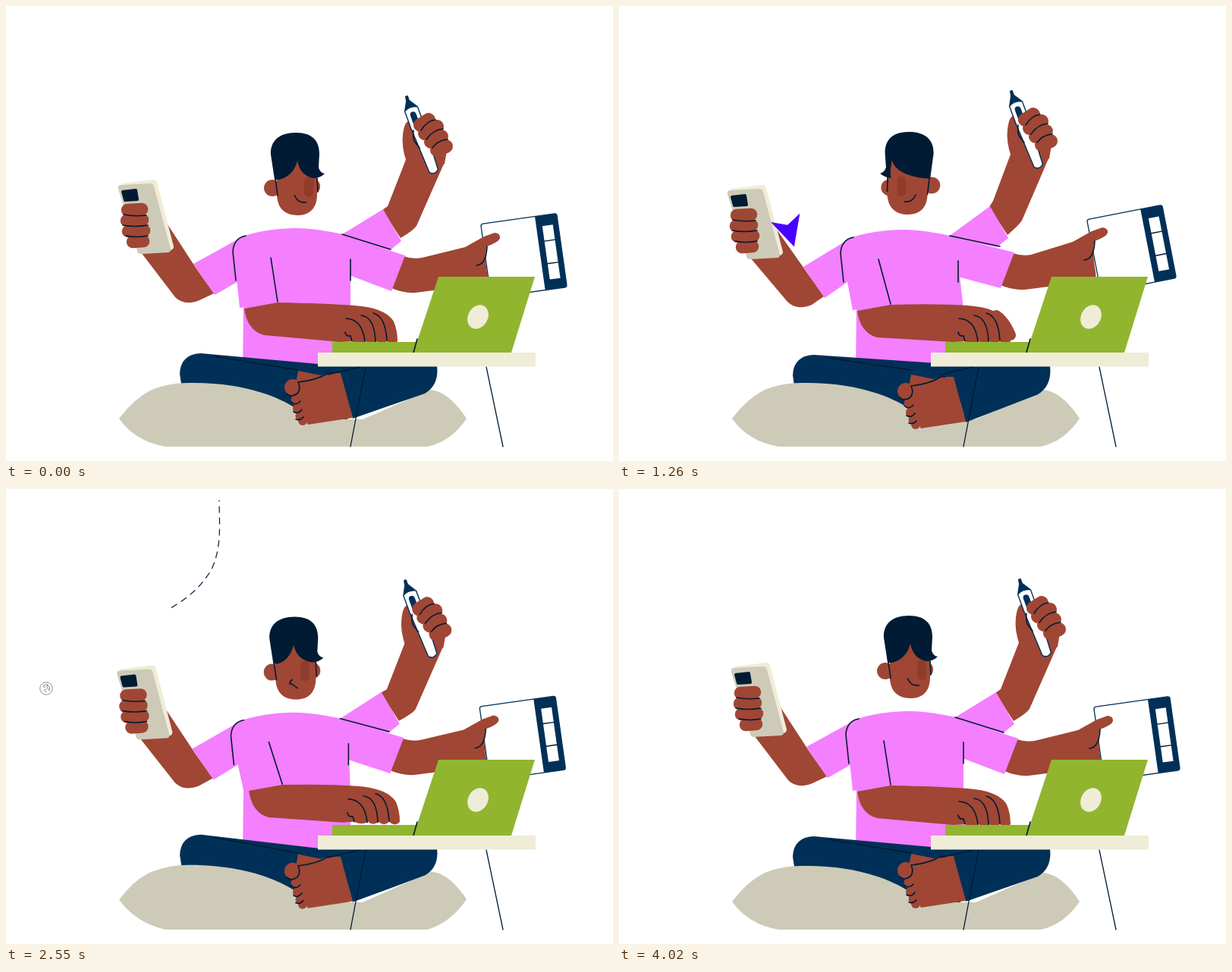
These frames come from a looping animation (800x600 px, 4.05 s). An HTML page:

```html
<!DOCTYPE html>
<html lang="en">
<head>
<meta charset="utf-8">
<title>Multitasking</title>
<style>
html, body { margin: 0; width: 100%; height: 100%; overflow: hidden; background: #fff; }
svg { display: block; width: 800px; height: 600px; }
</style>
</head>
<body>
<svg id="stage" viewBox="0 0 800 600"></svg>
<script>
const LOOP = 4050, STEP = 30;
const SKIN = '#a04634', PINK = '#f47fff', NAVY = '#003057', INK = '#001b33',
      SAND = '#cdcbb8', CREAM = '#efedd7', GREEN = '#91b52f', VIOLET = '#4a00ff';
const stage = document.getElementById('stage');

// Poses: 0 rest, 1 crouch left, 2 stretch left, 3 crouch right, 4 settle, 5 toss
const timeline = [[0, 0], [130, 2], [360, 1], [660, 2], [1260, 2], [1800, 0], [2250, 3],
                  [2600, 4], [2940, 4], [3420, 5], [3800, 0], [LOOP, 0]];
const parts = {
  shoulder:   [[0, 0], [-2, 7], [-7, 2], [4, 5], [-3, 1.5], [-7, 0]],
  elbow:      [[0, 0], [1, 7], [0, 3], [8, 1], [6, -1], [0, 2]],
  typing:     [[0, 0], [0, 0], [0, 0], [3, -7], [3, -3], [0, 0]],
  phoneElbow: [[0, 0], [5, 15], [-1, 6], [10, 9], [-1, 3], [-1, 5]],
  phone:      [[0, 0, 0], [-1, 19, -8], [-5, 7, 0], [5, 11, 0], [-2, 3, 0], [-1, 3, 5]],
  penSleeve:  [[0, 0], [6, 16], [-8, -4], [11, 19], [-3, -1.5], [-7, -3]],
  penElbow:   [[0, 0], [8, 20], [-10, -7], [13, 20], [-2, -1], [-9, -4]],
  pen:        [[0, 0, 0], [6, 20, 7], [-11, -7, 0], [4, 23, -5], [-2, 0, 0], [-5, -5, 8.5]],
  bookSleeve: [[0, 0], [-1, 5], [-5, -4], [3, 8], [-2, -1.5], [-3, -15]],
  bookHand:   [[0, 0], [3, 20], [-7, -7], [3, 25], [-2, -2], [-3, -25]],
  book:       [[0, 0, 0, 0], [6, 21, 5, 0], [-7, -9, -3, 0], [4, 24, 0, -12], [-2, -2, 0, 0], [-13, -110, 13.5, 14]],
  // x, y, tilt, facing, hair parting
  head:       [[0, 0, 0, 1, 0], [4, 14, 4, -.8, 15], [-3, -1, -1, -1, 20], [5, 11, -1.5, .6, -6],
               [-2, 1, 0, .7, -3], [-8, 0, -4, .9, 0]],
  cushion:    [[0, 0, 0], [-9, -24, -8], [0, 0, 0], [1, -13, -4], [0, -2, -1], [0, 2, 0]],
  knee:       [[0, 0], [2, -8], [0, 2], [2, -8], [0, -2], [0, 0]],
  foot:       [[0, 0], [1, -1], [0, 5], [-1, -2], [0, 1], [0, 0]]
};

const mix = (a, b, k) => a + (b - a) * k;
const smooth = k => k * k * (3 - 2 * k);
const at = (x, y, o) => `${x + o[0]} ${y + o[1]}`;

function span(keys, t) {
  let i = 0;
  while (i < keys.length - 2 && t >= keys[i + 1][0]) i++;
  const [a, b] = [keys[i], keys[i + 1]];
  return [a[1], b[1], Math.min(1, Math.max(0, (t - a[0]) / (b[0] - a[0])))];
}
const track = (keys, t) => mix(...span(keys, t));
function poseAt(t) {
  const [a, b, k] = span(timeline, t), pose = {};
  for (const name in parts)
    pose[name] = parts[name][a].map((v, i) => mix(v, parts[name][b][i], smooth(k)));
  return pose;
}

const fill = (color, d) => `<path fill="${color}" d="${d}"/>`;
const line = (d, width = 1.6) =>
  `<path fill="none" stroke="${INK}" stroke-width="${width}" stroke-linecap="round" d="${d}"/>`;
const limb = (d, width) =>
  `<path fill="none" stroke="${SKIN}" stroke-width="${width}" stroke-linecap="round" d="${d}"/>`;
const group = (transform, body) => `<g transform="${transform}">${body}</g>`;
const moved = (o, cx, cy, body) => group(`translate(${o[0]} ${o[1]}) rotate(${o[2] || 0} ${cx} ${cy})`, body);

// Flight path of the arrow, measured at its three stages
const route = document.createElementNS('http://www.w3.org/2000/svg', 'path');
const stages = ['M214 262L231 318C238 350 180 385 110 350C60 325 62 240 114 217',
                'C150 195 170 186 200 167C238 146 255 132 271 106', 'C285 75 281 45 281 15'];
let flight = '';
const [turnAt, climbAt, endAt] = stages.map(s => {
  route.setAttribute('d', flight += s);
  return route.getTotalLength();
});
const spot = s => route.getPointAtLength(s);

function arrow(t) {
  if (t < 1160 || t >= 2970) return '';
  const head = track([[1160, 0], [1260, 58], [2250, climbAt], [2550, endAt]], t);
  const tail = track([[1500, 60], [2250, turnAt], [2960, endAt - 1]], t);
  const back = track([[2250, 16], [2550, 0]], t);
  let d = '';
  for (let s = tail; s < head - back; s += 15) {
    const a = spot(s), b = spot(Math.min(s + 8, head));
    d += `M${a.x} ${a.y}L${b.x} ${b.y}`;
  }
  const size = track([[1160, .4], [1250, 2], [1300, 2], [1600, 1], [2430, 1], [2550, 0]], t);
  const tip = spot(head), rear = spot(Math.max(0, head - 14));
  const turn = Math.atan2(tip.y - rear.y, tip.x - rear.x) * 180 / Math.PI || 75;
  return line(d, 1.2) + group(`translate(${tip.x} ${tip.y}) rotate(${turn}) scale(${size})`,
    fill(VIOLET, 'M0 0L-20 -10L-15 0L-20 10Z'));
}

function badge(t) {
  const size = track([[1700, 0], [1830, 1.35], [1950, 1], [2400, 1], [2480, 1.12], [2600, 0]], t);
  return size ? group(`translate(53 263) scale(${size})`,
    `<circle r="17.7" fill="#fff" stroke="${NAVY}" stroke-width="1.1"/>` +
    line('M-2 -11Q-9 -10 -8 -5Q-6 -2 -2 -4M0 2Q-6 2 -5 6Q-4 10 0 10M2 -11Q12 -7 9 6Q3 2 2 -11Z', 1.1)) : '';
}

function phoneArm(p) {
  const s = p.shoulder.map((v, i) => (v + p.phoneElbow[i]) / 2), e = p.phoneElbow, h = p.phone;
  const fingers = [[160, 269, 179], [159, 283, 180], [161, 297, 182], [167, 311, 181]];
  return fill(SKIN, `M${at(250, 345, s)}L${at(213, 288, h)}L${at(178, 325, h)}L${at(223, 384, e)}Q${at(235, 396, e)} ${at(255, 388, e)}L${at(274, 379, s)}Z`) +
    fill(PINK, `M${at(247, 340, s)}L${at(314, 303, p.shoulder)}L${at(308, 362, p.shoulder)}L${at(275, 381, s)}Z`) +
    moved(h, 170, 290,
      fill(CREAM, 'M152 234L194 229Q198 229 199 233L221 317Q221 321 217 322L195 325Z') +
      fill(SAND, 'M152 236L190 234Q194 234 195 238L217 321Q217 325 213 325L178 327Q174 327 173 323L148 241Q147 236 152 236Z') +
      fill(INK, 'M153 243L171 241Q173 241 173 243L175 255Q175 257 173 257L157 258Q155 258 155 256L152 245Z') +
      fingers.map(([x, y, x2]) => limb(`M${x} ${y}L${x2} ${y - 1}`, 16.5)).join('') +
      line('M155 275Q168 278 185 276M154 289Q170 292 187 289M158 303Q172 306 187 303'));
}

function penArm(p) {
  const q = p.penSleeve, e = p.penElbow, h = p.pen;
  const fingers = ['M546 157L557 150', 'M552 168L568 159', 'M560 179L574 172', 'M568 190L580 185'];
  return fill(SKIN, `M${at(496, 269, q)}L${at(503, 264, e)}L${at(528, 200, h)}L${at(578, 206, h)}L${at(541, 290, e)}Q${at(537, 296, e)} ${at(520, 306, q)}Z`) +
    fill(PINK, `M${at(440, 303, p.shoulder)}L${at(497, 268, q)}L${at(521, 310, q)}L${at(506, 322, q)}Z`) +
    moved(h, 560, 175,
      fill(SKIN, 'M528 206Q521 185 523 170Q525 152 531 152Q537 153 538 165L550 155L582 185L578 208L560 220Z') +
      group('translate(527.5 118) rotate(-20)',
        fill(NAVY, 'M-2 1Q0 -1 2 1L2 7L9 18H-9L-3 7Z') +
        `<path fill="#fff" stroke="${NAVY}" stroke-width="1.4" d="M-9 19Q0 14 9 19L9 42L6 106Q0 112 -6 106L-9 42Z"/>` +
        `<rect x="-4" y="23" width="8" height="23" rx="4" fill="${NAVY}"/>`) +
      fingers.map(d => limb(d, 18)).join('') +
      line('M547 164Q555 151 566 150M554 176Q563 163 576 162M562 187Q569 177 582 176M537 164Q536 172 538 178L545 187'));
}

function notebook(p, t) {
  const [x, y, turn, sheet] = p.book;
  const k = (t - 3420) / 320, lift = k > 0 && k < 1 ? 75 * Math.sin(Math.PI * k) ** 2 : 0;
  const paper = `fill="#fff" stroke="${NAVY}" stroke-width="1.3"`;
  return group(`translate(${683 + x} ${329 + y - lift}) rotate(${turn - 8})`,
    (Math.abs(sheet) > 1 ? group(`rotate(${sheet})`, `<rect x="-36" y="-52" width="72" height="96" ${paper}/>`) : '') +
    `<rect x="-51" y="-49" width="101" height="98" rx="3" ${paper}/>` +
    fill(NAVY, 'M21 -49H47Q50 -49 50 -46V46Q50 49 47 49H21Z') +
    fill('#fff', 'M29 -35H43V36H29Z') + line('M29 -15H43M29 15H43', 1.4));
}

function bookArm(p, t) {
  const b = p.bookSleeve, h = p.bookHand;
  const open = t >= 3150 && t < 3750;
  const hand = open
    ? moved([b[0] + 3, b[1] + 15], 0, 0,
        fill(SKIN, 'M515 313Q530 318 541 312L583 283Q591 272 593 255Q598 242 605 243Q611 248 604 263L618 264L640 265Q655 264 659 270Q660 275 656 278Q665 284 662 291Q655 300 640 306L608 314L546 354Q536 361 510 356Z') +
        line('M609 274Q613 283 609 293M633 264Q627 274 617 278M649 268Q641 282 627 287M657 277Q648 290 636 296M661 287Q655 294 644 299'))
    : fill(SKIN, `M${at(524, 330, b)}Q${at(536, 334, b)} ${at(548, 332, b)}L${at(605, 318, h)}L${at(630, 304, h)}L${at(644, 299, h)}Q${at(652, 300, h)} ${at(651, 306, h)}Q${at(650, 311, h)} ${at(634, 317, h)}Q${at(630, 330, h)} ${at(635, 357, h)}L${at(634, 366, b)}L${at(540, 378, b)}Q${at(524, 379, b)} ${at(508, 372, b)}Z`) +
      line(`M${at(634, 317, h)}Q${at(633, 341, h)} ${at(620, 342, h)}`);
  return hand + fill(PINK, `M${at(440, 301, p.shoulder)}L${at(526, 329, b)}L${at(508, 376, b)}L${at(450, 354, p.shoulder)}Z`);
}

function legs(p) {
  const k = p.knee, f = p.foot, [dx, tip, top] = p.cushion;
  const end = 472 - k[1] * .75;
  const left = [dx, tip], right = [-dx, tip * 1.12], crest = [0, top];
  const toes = [[383, 519, 7.5], [385, 531, 7], [388, 541, 6.5], [391, 547, 6]];
  return fill(NAVY, `M${at(257, 458, k)}Q${at(230, 459, k)} ${at(229, 485, k)}L${at(232, 505, k)}L390 545H450V475L411 ${end}Z`) +
    line(`M${at(275, 462, k)}L${385 + k[0]} 480`) +
    fill(SAND, `M${at(149, 544, left)}Q${at(172, 514, left)} ${at(195, 505, crest)}Q${at(218, 496, crest)} ${at(245, 497, crest)}C${at(298, 497, crest)} 345 508 378 528L400 545H470L${at(560, 506, crest)}Q${at(584, 509, right)} ${at(607, 544, right)}Q${at(587, 574, right)} 556 581H210Q${at(170, 574, left)} ${at(149, 544, left)}Z`) +
    fill(NAVY, `M436 470L568 474Q571 ${500 + k[1] * .5} 552 ${511 + k[1] * .6}L${at(457, 544, f)}Z`) +
    moved(f, 0, 0,
      fill(SKIN, 'M385 481L415 487L424 484L441 484L457 543L398 552L378 520Z') +
      `<circle cx="378" cy="503" r="11" fill="${SKIN}"/>` +
      toes.map(([x, y, r]) => `<circle cx="${x}" cy="${y}" r="${r}" fill="${SKIN}"/>`).join('') +
      line('M370 511Q376 517 384 511Q389 505 385 496Q411 493 424 484L430 484M376 522Q382 528 388 521M379 535Q385 539 390 532M382 545Q388 547 392 542')) +
    line('M424 486L467 476');
}

function torso(p) {
  const s = p.shoulder;
  return fill(PINK, `M${at(314, 303, s)}C${at(340, 295, s)} ${at(365, 293, s)} ${at(384, 293, s)}S${at(424, 297, s)} ${at(444, 301, s)}L${at(454, 335, s)}L454 400V480H312L313 397L${at(300, 325, s)}Q${at(300, 307, s)} ${at(314, 303, s)}Z`);
}

function frontArm(p, t) {
  const s = p.shoulder, e = p.elbow, h = p.typing, b = p.bookSleeve;
  return fill(PINK, `M${at(300, 320, s)}L${at(308, 398, e)}L${at(358, 391, e)}L${at(362, 320, s)}Z`) +
    line(`M${at(316, 303, s)}Q${at(300, 306, s)} ${at(299, 324, s)}L${at(303, 362, s)}M${at(349, 332, s)}L${at(358, 390, e)}M${at(443, 301, s)}L${at(507, 321, b)}M${at(454, 334, s)}L${at(454, 362, s)}`) +
    fill(SKIN, `M${at(314, 399, e)}L${at(358, 391, e)}Q${at(420, 392, h)} ${at(460, 395, h)}Q${at(500, 398, h)} ${at(511, 416, h)}Q${at(516, 428, h)} ${at(516, 442, h)}q-6 7 -14 0q-7 7 -14 0q-7 6 -14 0q-8 5 -18 0L${at(440, 443, h)}L${at(340, 434, e)}Q${at(318, 428, e)} ${at(314, 399, e)}Z`) +
    (t >= 1200 && t < 1350 ? limb('M497 408Q508 415 516 434', 14) : '') +
    moved(h, 0, 0, line('M448 412Q470 413 473 443M468 408Q486 410 487 443M484 405Q500 409 502 441M447 430Q448 436 454 435L456 442'));
}

function head(p, t) {
  const [x, y, tilt, u, part] = p.head, side = u < 0 ? -1 : 1;
  const ear = (cx, cy) => `<circle cx="${cx}" cy="${cy}" r="11" fill="${SKIN}"/>`;
  const smile = group(`translate(3.5 -22) scale(${side} 1)`, line('M-7 -4Q-3 6 8 5'));
  const mouth = t >= 3200 && t < 3750 ? line('M-5 -22L8 -16')
    : t >= 1800 && t < 3200 ? line('M-8 -20Q-9 -24 -5 -26M-8 -22L2 -15') : smile;
  return group(`translate(${384 + x} ${276 + y}) rotate(${tilt})`,
    ear(-28.5 - 4.5 * u, -36) + ear(25.5 - 6.5 * u, -38) +
    fill(SKIN, 'M-27 -75V-28C-27 -11 -18 0 0 0S26 -11 26 -28V-75Z') +
    `<rect x="${-2.5 + 11.5 * u}" y="-51" width="12" height="27" rx="6" fill="#8f3d2a"/>` + mouth +
    group(`scale(${side} 1)`, line('M-29 -48L-26 -26M26 -49L27 -31') +
      fill(INK, `M-30 -47L-35 -80C-36 -98 -24 -109 -2 -109C20 -109 29 -98 29 -81L28 -63Q30 -56 36 -55Q30 -49 21 -49Q${part + 4} -52 ${part} -72Q${part - 5} -52 -24 -47Z`)));
}

const desk =
  fill(GREEN, 'M430 443H545V457H430Z') + fill(GREEN, 'M570 357H697L666 457H537Z') +
  `<ellipse cx="622" cy="410" rx="13" ry="16.5" transform="rotate(28 622 410)" fill="${CREAM}"/>` +
  line('M537 457L542 439') + line('M474 476L454 581M633 476L655 581', 1.3) +
  fill(CREAM, 'M411 457H698V475.5H411Z');

function draw(t) {
  const p = poseAt(t);
  stage.innerHTML = badge(t) + phoneArm(p) + arrow(t) + penArm(p) + notebook(p, t) + bookArm(p, t) +
    torso(p) + legs(p) + frontArm(p, t) + head(p, t) + desk;
}

const start = performance.now();
function tick() {
  const t = (performance.now() - start) % LOOP;
  draw(Math.floor(t / STEP) * STEP);
  requestAnimationFrame(tick);
}
tick();
</script>
</body>
</html>
```
